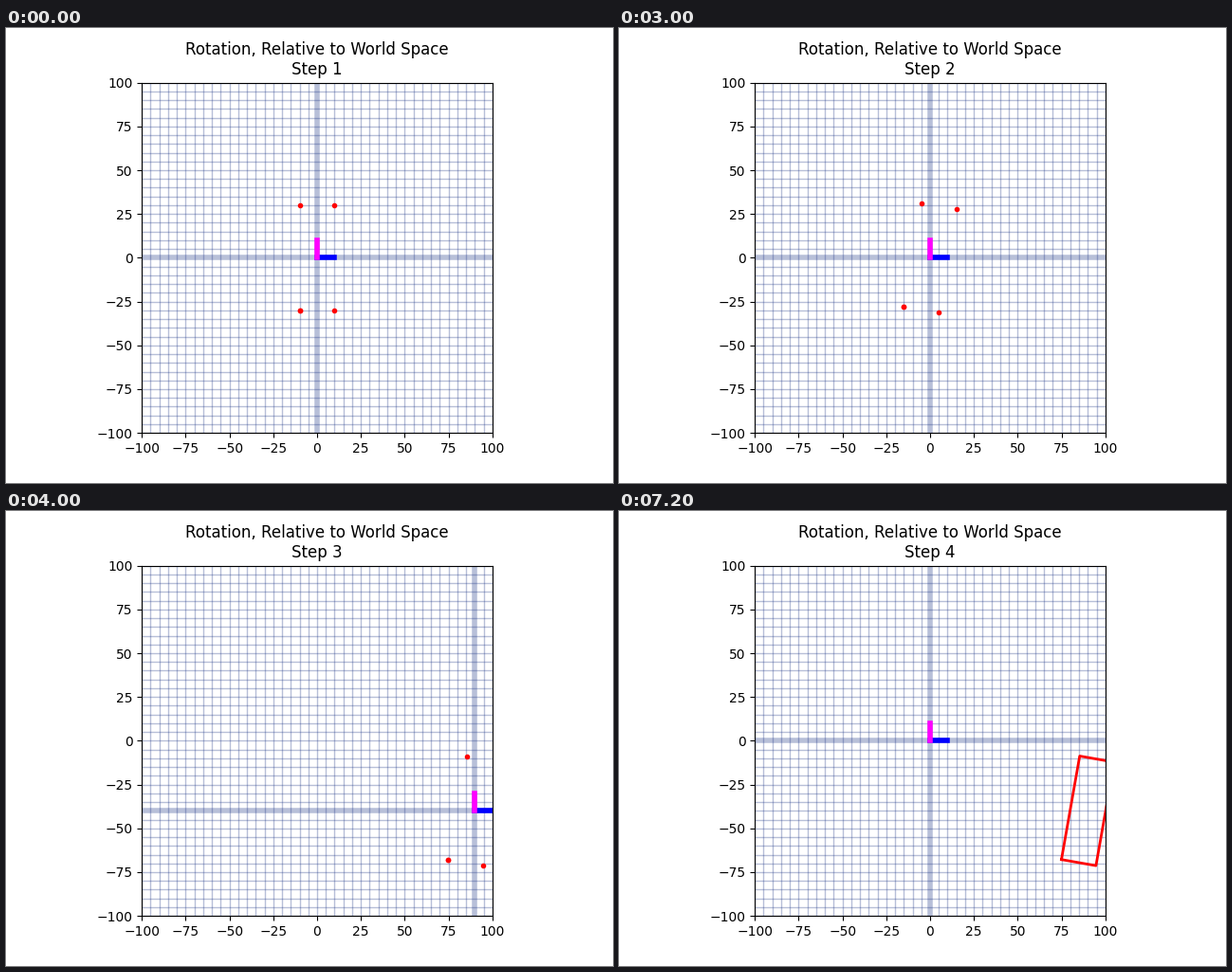
A matplotlib script for the animation above (8000 ms loop, 640x480 px).

```python
import numpy as np
import matplotlib.pyplot as plt
from matplotlib.animation import FuncAnimation

GRID = "#132c80"
REACH = 200
SPIN = -10
SHIFT = np.array([90, -40])
BOX = np.array([[-10, -30], [-10, 30], [10, 30], [10, -30], [-10, -30]])

fig, ax = plt.subplots(figsize=(6.4, 4.8), dpi=100)


def rotate(points, degrees):
    a = np.radians(degrees)
    c, s = np.cos(a), np.sin(a)
    return np.asarray(points) @ np.array([[c, s], [-s, c]])


TURNED = rotate(BOX, SPIN)
MOVED = TURNED + SHIFT


def segment(p, q, angle, origin, **style):
    ends = rotate([p, q], angle) + origin
    ax.plot(ends[:, 0], ends[:, 1], **style)


def draw_space(angle, origin, up_color):
    for v in range(-REACH, REACH + 1, 5):
        style = dict(color=GRID, alpha=0.3, lw=1 if v else 4)
        segment((v, -REACH), (v, REACH), angle, origin, **style)
        segment((-REACH, v), (REACH, v), angle, origin, **style)
    segment((0, 0), (10, 0), angle, origin, color="blue", lw=4)
    segment((0, 0), (0, 10), angle, origin, color=up_color, lw=4)


def scene(second):
    """Step, grid angle, grid origin and shape corners at a given second."""
    if second < 2:
        return 1, 0, (0, 0), BOX
    if second < 4:
        return 2, SPIN if second == 2 else 0, (0, 0), TURNED
    if second < 6:
        return 3, 0, SHIFT if second == 4 else (0, 0), MOVED
    return 4, 0, (0, 0), MOVED


def draw(second):
    step, angle, origin, shape = scene(second)
    dot_color, up_color = ("#b30062",) * 2 if angle else ("red", "magenta")
    ax.clear()
    draw_space(angle, origin, up_color)
    if step == 4:
        ax.plot(shape[:, 0], shape[:, 1], color="red", lw=2)
    else:
        ax.plot(shape[:, 0], shape[:, 1], ".", color=dot_color)
    ax.set(xlim=(-100, 100), ylim=(-100, 100), aspect="equal",
           xticks=range(-100, 101, 25), yticks=range(-100, 101, 25))
    ax.set_title(f"Rotation, Relative to World Space\nStep {step}")
    return ax.get_children()


anim = FuncAnimation(fig, draw, frames=8, interval=1000, repeat=True,
                     repeat_delay=0, init_func=lambda: draw(0))
plt.show()
```
